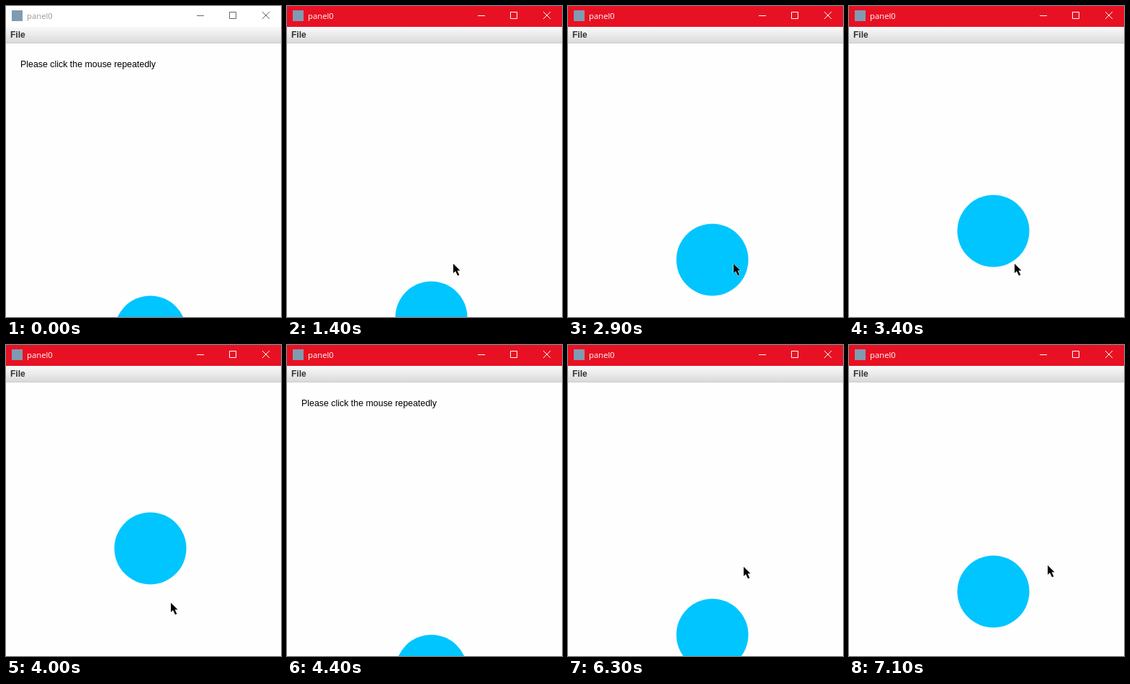
An HTML page with a canvas for the animation above (7200 ms loop, 382x432 px).

```html
<!DOCTYPE html>
<html>
<head>
<meta charset="utf-8">
<style>
html, body { margin: 0; overflow: hidden; background: #fff; }
canvas { display: block; }
</style>
</head>
<body>
<canvas width="382" height="432"></canvas>
<script>
const ctx = document.querySelector('canvas').getContext('2d');
const LOOP = 7200, TICK = 100;
const FOCUS = 800, RESET = 4300;

// Each click lifts the ball by 10 px; the reset drops it back.
const clicks = [900, 1200, 1500, 1700, 1900, 2100, 2300, 2400, 2600, 2800,
  3000, 3100, 3300, 3400, 3600, 3800, 3900, 4100, 4200,
  5200, 5500, 5800, 6000, 6300, 6400, 6600, 6700, 6800, 7000, 7100];

// Pointer path: time, x, y
const path = [[0, 300, 440], [300, 300, 440], [700, 231, 358], [1900, 231, 358],
  [2900, 230, 358], [4000, 229, 358], [4200, 229, 358], [4400, 270, 436],
  [4900, 270, 436], [5300, 244, 308], [7000, 244, 308], [7100, 276, 306]];

function pointerAt(t) {
  const i = path.findIndex(p => p[0] > t);
  if (i < 0) return path[path.length - 1].slice(1);
  const [t0, x0, y0] = path[i - 1], [t1, x1, y1] = path[i];
  const k = (t - t0) / (t1 - t0);
  return [Math.round(x0 + (x1 - x0) * k), Math.round(y0 + (y1 - y0) * k)];
}

function text(str, x, y, font, color) {
  ctx.font = font;
  ctx.fillStyle = color;
  ctx.fillText(str, x, y);
}

function rect(x, y, w, h, color) {
  ctx.fillStyle = color;
  ctx.fillRect(x, y, w, h);
}

function drawWindow(active) {
  rect(0, 0, 382, 432, '#fefefe');
  rect(0, 0, 382, 29, active ? '#e81123' : '#fff');
  rect(8, 6, 15, 15, '#7f9bb2');
  text('panel0', 29, 18, '11.3px "Open Sans", sans-serif', active ? '#fff' : '#999');

  ctx.strokeStyle = active ? '#fff' : '#666';
  ctx.lineWidth = 1;
  ctx.beginPath();
  ctx.moveTo(265, 13.5);
  ctx.lineTo(275, 13.5);
  ctx.rect(310.5, 8.5, 9, 9);
  ctx.moveTo(356, 8);
  ctx.lineTo(366, 18);
  ctx.moveTo(366, 8);
  ctx.lineTo(356, 18);
  ctx.stroke();

  const shade = ctx.createLinearGradient(0, 29, 0, 51);
  shade.addColorStop(0, '#fafafa');
  shade.addColorStop(1, '#dadada');
  rect(0, 29, 382, 22, shade);
  rect(0, 51, 382, 1, '#ccc');
  text('File', 6, 44, 'bold 12px "Liberation Sans", Arial, sans-serif', '#333');
}

function drawBall(count) {
  ctx.fillStyle = '#00c5ff';
  ctx.beginPath();
  ctx.arc(200.5, 452.5 - 10 * count, 50, 0, 2 * Math.PI);
  ctx.fill();
}

function drawPointer([x, y]) {
  const arrow = new Path2D('M0 0V13L3 10.2L6 16.5L8.3 15.5L5.5 9.5H9.5Z');
  ctx.save();
  ctx.translate(x, y);
  ctx.strokeStyle = '#fff';
  ctx.stroke(arrow);
  ctx.fillStyle = '#000';
  ctx.fill(arrow);
  ctx.restore();
}

function draw(now) {
  const t = Math.floor(now % LOOP / TICK) * TICK;
  const start = t < RESET ? 0 : RESET;
  const count = clicks.filter(c => c >= start && c <= t).length;
  drawWindow(t >= FOCUS);
  if (!count) {
    text('Please click the mouse repeatedly', 20, 85,
      '12.4px "Liberation Sans", Arial, sans-serif', '#000');
  }
  drawBall(count);
  drawPointer(pointerAt(t));
}

const began = performance.now();
function frame() {
  draw(performance.now() - began);
  requestAnimationFrame(frame);
}
frame();
</script>
</body>
</html>
```
